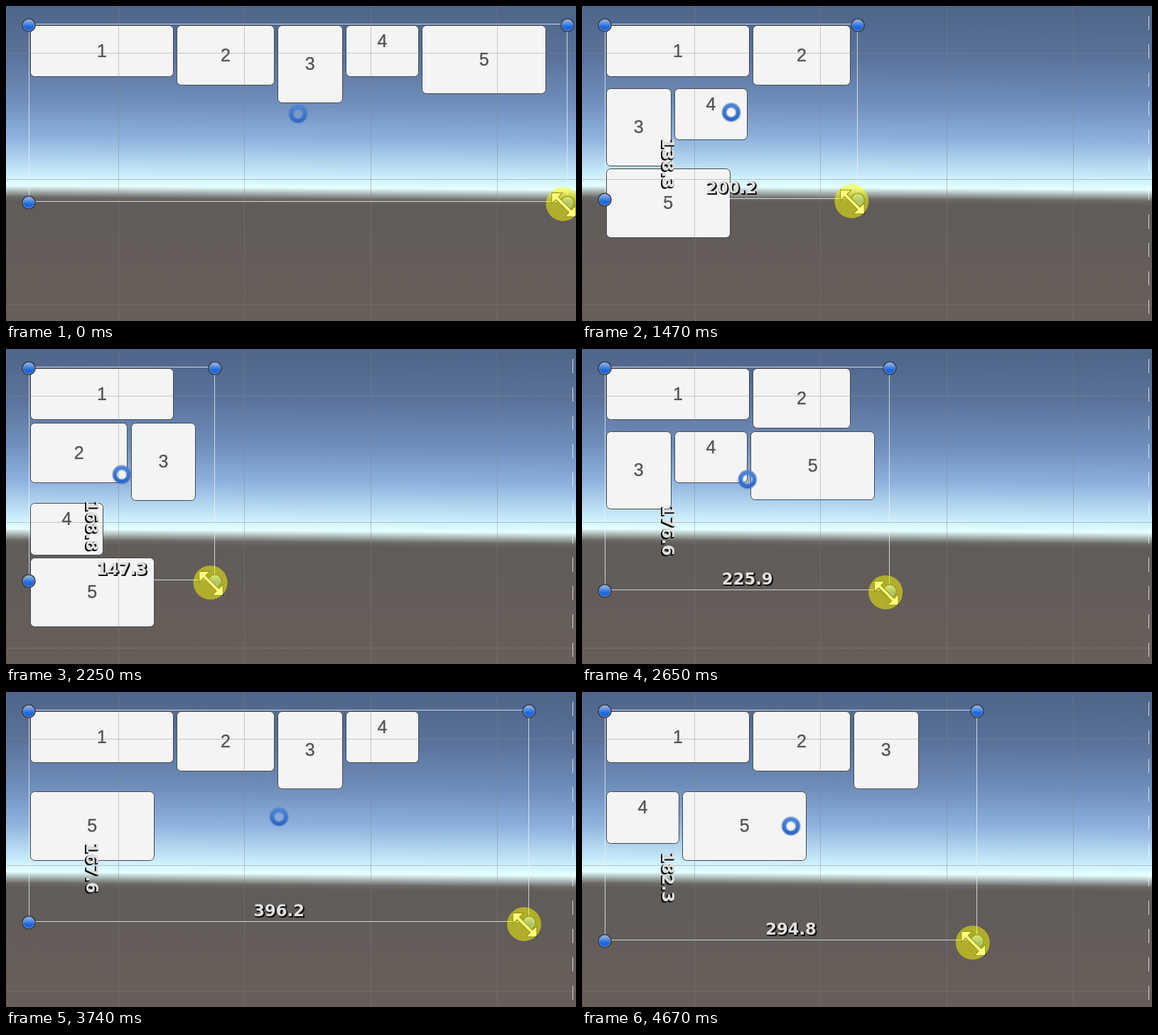
Write an HTML page with a canvas that moves like this. It is 802x444 px and loops after 4770 ms.

```html
<!DOCTYPE html>
<html lang="en">
<head>
<meta charset="utf-8">
<title>Flow layout resize</title>
<style>
  html, body { margin: 0; width: 100%; height: 100%; overflow: hidden; background: #655d58; }
  canvas { display: block; width: 802px; height: 444px; }
</style>
</head>
<body>
<canvas id="stage" width="802" height="444"></canvas>
<script>
const ctx = document.getElementById('stage').getContext('2d');
const W = 802, H = 444, LOOP = 4770, STEP = 78;
const LEFT = 32, TOP = 27, UNIT = 1.7776, GAP = 4.4;

// Turning points of the drag
const path = [
  { t: 160, w: 426.4, h: 140.6 },
  { t: 700, w: 277.9, h: 122.6 },
  { t: 850, w: 235, h: 121 },
  { t: 1470, w: 200.2, h: 138.3 },
  { t: 2250, w: 147.3, h: 168.8 },
  { t: 3120, w: 353.4, h: 181.1 },
  { t: 3740, w: 396.2, h: 167.6 },
  { t: 4210, w: 287, h: 173 },
  { t: 4670, w: 294.8, h: 182.3 }
];

const tiles = [
  { w: 202, h: 72.6 },
  { w: 137.2, h: 84.6 },
  { w: 91.6, h: 109 },
  { w: 103, h: 72.6, shift: -14 },
  { w: 174.5, h: 96.8 }
];

const segment = t => path.findLastIndex(p => p.t <= t);

// The picture refreshes in even steps between turning points
function snap(t) {
  const i = segment(t);
  if (i < 0 || i === path.length - 1) return t;
  const { t: start } = path[i], span = path[i + 1].t - start;
  const step = span / Math.round(span / STEP);
  return start + step * Math.floor((t - start) / step);
}

function slope(i, key) {
  if (i < 1 || i >= path.length - 1) return 0;
  const rate = j => (path[j + 1][key] - path[j][key]) / (path[j + 1].t - path[j].t);
  const a = rate(i - 1), b = rate(i);
  return a * b > 0 ? 2 * a * b / (a + b) : 0;
}

// Monotone cubic through the turning points
function sample(t, key) {
  const i = segment(t);
  if (i < 0) return path[0][key];
  if (i === path.length - 1) return path[i][key];
  const a = path[i], b = path[i + 1];
  const d = b.t - a.t, u = (t - a.t) / d, v = 1 - u;
  return a[key] * (1 + 2 * u) * v * v + b[key] * u * u * (3 - 2 * u)
    + d * u * v * (slope(i, key) * v - slope(i + 1, key) * u);
}

const rightAt = t => LEFT + sample(t, 'w') * UNIT;

function gradient(x0, y0, x1, y1, stops) {
  const g = ctx.createLinearGradient(x0, y0, x1, y1);
  stops.forEach(([p, color]) => g.addColorStop(p, color));
  return g;
}

function disc(x, y, r, fill) {
  ctx.beginPath();
  ctx.arc(x, y, r, 0, Math.PI * 2);
  ctx.fillStyle = fill;
  ctx.fill();
}

const sky = gradient(0, 0, -3.3, H, [
  [0, '#4f658a'], [0.15, '#5a729a'], [0.3, '#6f8ebb'], [0.42, '#8fb3de'],
  [0.53, '#c8ebfa'], [0.57, '#e4ffff'], [0.606, '#6c6966'], [0.62, '#605c59'], [1, '#685e59']
]);

function drawGrid() {
  ctx.fillStyle = 'rgba(128,132,134,.42)';
  for (let i = 0; i < 4; i++) ctx.fillRect(Math.floor(158 + i * 177.7), 0, 1, H);
  for (let i = 0; i < 3; i++) ctx.fillRect(0, Math.floor(66.4 + i * 177.6), W, 1);
}

// Flow layout: a tile wraps when it would cross the right edge
function layout(right) {
  let x = LEFT + 2, y = TOP + 0.5, row = 0;
  return tiles.map(({ w, h, shift = 0 }) => {
    if (row && x + w > right) {
      x = LEFT + 2;
      y += row + GAP;
      row = 0;
    }
    const box = { x, y, w, h, shift };
    x += w + GAP;
    row = Math.max(row, h);
    return box;
  });
}

function drawTiles(boxes) {
  ctx.lineWidth = 1;
  ctx.fillStyle = '#f4f4f4';
  ctx.strokeStyle = '#454a50';
  for (const { x, y, w, h } of boxes) {
    const px = Math.round(x) + 0.5, py = Math.round(y) - 0.5;
    ctx.beginPath();
    ctx.roundRect(px, py, Math.round(x + w) - 0.5 - px, Math.round(y + h) - 0.5 - py, 6);
    ctx.fill();
    ctx.stroke();
  }
}

function drawLabels(boxes) {
  ctx.font = '25px "Liberation Sans", Arial, sans-serif';
  ctx.fillStyle = '#505453';
  ctx.strokeStyle = 'rgba(80,84,83,.5)';
  ctx.lineWidth = 0.7;
  boxes.forEach(({ x, y, w, h, shift }, i) => {
    const at = [i + 1, x + w / 2, y + h / 2 + shift + 8];
    ctx.fillText(...at);
    ctx.strokeText(...at);
  });
}

function drawHandle(x, y, active) {
  disc(x, y, 9.8, '#2c3643');
  disc(x, y, 8.4, active ? '#9db4c6' : '#7f94b2');
  const [top, bottom] = active ? ['#b4cde0', '#5a8fd4'] : ['#9dbce6', '#1d68e0'];
  disc(x, y, 7.6, gradient(0, y - 8, 0, y + 8, [[0, top], [0.65, bottom], [1, bottom]]));
}

function drawPivot(x, y) {
  const ring = (width, color) => {
    ctx.beginPath();
    ctx.arc(x, y, 9.8, 0, Math.PI * 2);
    ctx.lineWidth = width;
    ctx.strokeStyle = color;
    ctx.stroke();
  };
  ring(8, 'rgba(70,115,190,.45)');
  ring(5, gradient(0, y - 13, 0, y + 13, [[0, '#5088da'], [1, '#2a65c4']]));
}

function drawSize(value, x, y, angle) {
  const text = value.toFixed(1);
  ctx.save();
  ctx.translate(x, y);
  ctx.rotate(angle);
  ctx.font = 'bold 22.7px "DejaVu Sans", Verdana, sans-serif';
  ctx.fillStyle = ctx.strokeStyle = '#101010';
  ctx.lineWidth = 1.5;
  ctx.lineJoin = 'round';
  ctx.strokeText(text, 1, 9);
  ctx.fillText(text, 2, 10);
  ctx.fillStyle = '#e0e0e0';
  ctx.fillText(text, 0, 8);
  ctx.restore();
}

function drawPointer(x, y) {
  ctx.save();
  ctx.translate(x + 1, y + 1);
  ctx.rotate(Math.PI / 4);
  ctx.beginPath();
  const half = [[-24, 0], [-13, -10.6], [-13, -2.4], [13, -2.4], [13, -10.6], [24, 0]];
  half.forEach(([a, b]) => ctx.lineTo(a, b));
  half.reverse().forEach(([a, b]) => ctx.lineTo(a, -b));
  ctx.closePath();
  ctx.fillStyle = '#fff';
  ctx.fill();
  ctx.lineWidth = 1;
  ctx.strokeStyle = '#222';
  ctx.stroke();
  ctx.restore();
  disc(x, y, 24, 'rgba(255,255,0,.5)');
}

function draw(time) {
  const t = snap(time), dragging = time >= 240;
  const w = sample(t, 'w'), h = sample(t, 'h');
  const right = rightAt(t), bottom = TOP + h * UNIT;
  const midX = (LEFT + right) / 2, midY = (TOP + bottom) / 2;
  const rx = Math.round(right), by = Math.round(bottom);
  const boxes = layout(right);

  ctx.textAlign = 'center';
  ctx.fillStyle = sky;
  ctx.fillRect(0, 0, W, H);
  drawTiles(boxes);
  drawGrid();
  drawLabels(boxes);

  if (dragging) {
    ctx.fillStyle = 'rgba(255,255,255,.75)';
    for (let y = 14; y < H; y += 40) ctx.fillRect(797, y, 1, 20);
  }

  ctx.lineWidth = 1;
  ctx.strokeStyle = 'rgba(232,241,252,.8)';
  ctx.strokeRect(LEFT + 0.5, 25.5, rx - LEFT - 1, by - 27);

  drawHandle(LEFT, TOP);
  drawHandle(rx, TOP);
  drawHandle(LEFT, by);
  drawHandle(rx, by, true);
  drawPivot(midX, midY);

  if (dragging) {
    drawSize(w, midX, bottom - 17.2, 0);
    drawSize(h, 121, midY + 71.8, Math.PI / 2);
  }
  // The pointer runs ahead of the handle on leftward pulls
  drawPointer(Math.min(right, rightAt(t + 20)) - 6.3, bottom + 2.2);
}

function tick() {
  draw(performance.now() % LOOP);
  requestAnimationFrame(tick);
}
tick();
</script>
</body>
</html>
```
